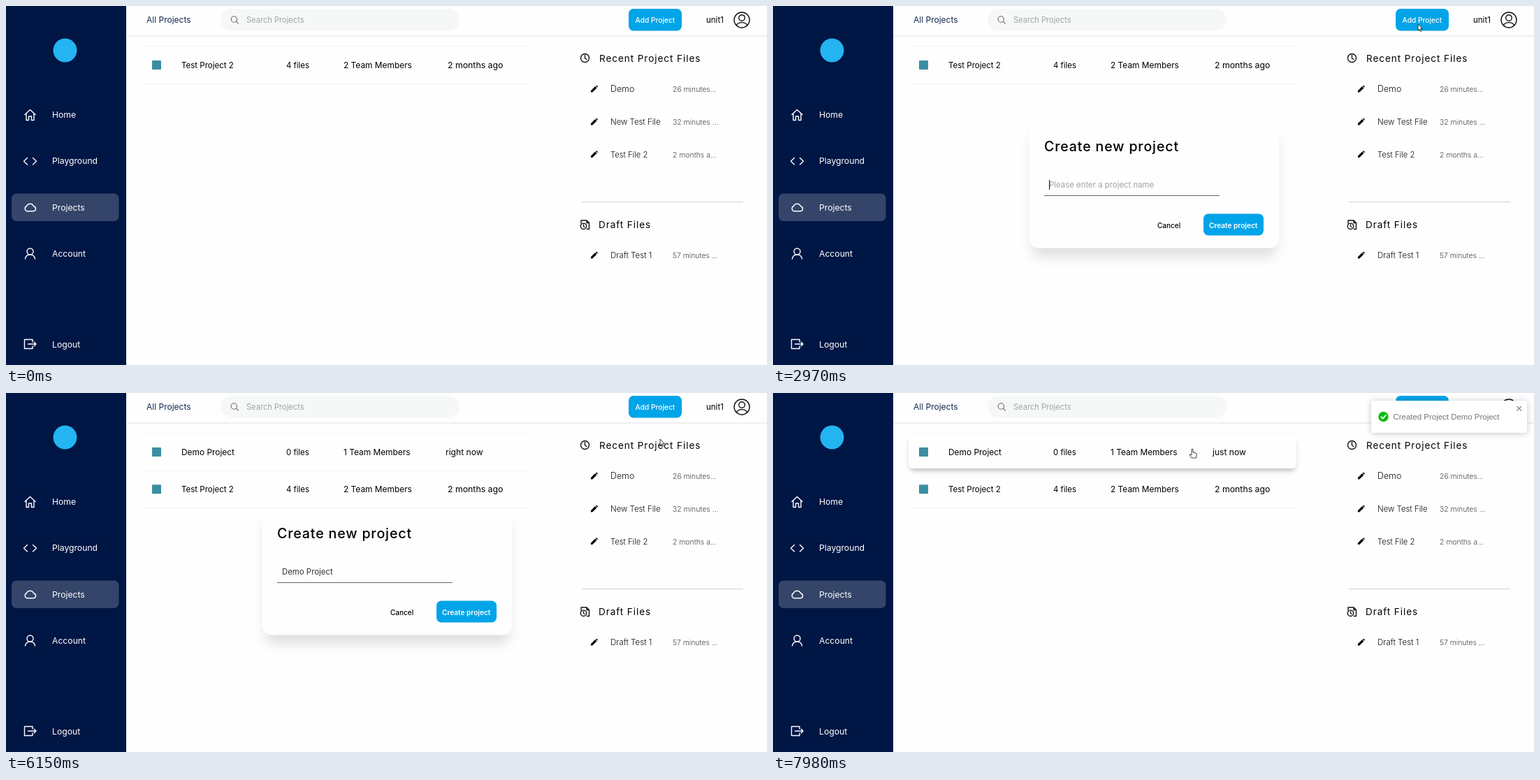
Write an HTML page that moves like this. It is 1089 by 514 pixels and loops after 8 s.

```html
<!DOCTYPE html>
<html lang="en">
<head>
<meta charset="utf-8">
<title>Projects dashboard</title>
<style>
  html, body { margin: 0; width: 100%; height: 100%; overflow: hidden; background: #fefefe; }
  svg { display: block; width: 100vw; height: 100vh; }
  text { font: 12px Inter, sans-serif; white-space: pre; }
  .line { fill: none; stroke: #fff; stroke-width: 1.4; stroke-linecap: round; stroke-linejoin: round; }
  .dark { stroke: #111; }
  .rule { stroke: #f4f5f5; }
  .blue { fill: #00a4e8; }
  #files text { font-weight: 300; }
  .cursor path { fill: #fff; stroke: #111; stroke-width: .8; stroke-linejoin: round; }
</style>
</head>
<body>
<svg viewBox="0 0 1089 514">
  <defs>
    <path id="pencil" d="M-4.6 4.6V2.3L1.6-3.9 3.9-1.6-2.3 4.6ZM2.3-4.5 3-5.1Q3.6-5.5 4.2-5L5-4.2Q5.5-3.6 5.1-3L4.5-2.3Z"/>
    <rect id="swatch" x="209" y="78" width="13" height="13" rx="1" fill="#3b8ea2"/>
  </defs>
  <rect width="1089" height="514" fill="#fefefe"/>

  <!-- project rows -->
  <path class="rule" d="M194 57.5H750M194 111.5H750"/>
  <path id="newRule" class="rule" d="M194 164.5H750"/>
  <g id="card">
    <rect x="196" y="66" width="551" height="45" rx="6" fill-opacity=".26" style="filter:blur(3.5px)"/>
    <rect x="194" y="58" width="555" height="50" rx="6" fill="#fefefe"/>
  </g>
  <g id="newRow">
    <use href="#swatch"/>
    <text x="251" y="88.5" style="font-size:11.9px">Demo Project</text>
    <text x="401" y="88.5" style="font-size:11.4px">0 files</text>
    <text x="483" y="88.5" style="font-size:11.9px">1 Team Members</text>
    <text id="age" x="629" y="88.5" style="font-size:12.1px">right now</text>
  </g>
  <g id="oldRow">
    <use href="#swatch"/>
    <text x="251" y="88.5" style="font-size:11.5px">Test Project 2</text>
    <text x="401" y="88.5" style="font-size:11.4px">4 files</text>
    <text x="483" y="88.5" style="font-size:11.9px">2 Team Members</text>
    <text x="632" y="88.5" style="font-size:12.3px">2 months ago</text>
  </g>

  <!-- header -->
  <rect x="172" y="42" width="917" height="2" fill="#efefef"/>
  <rect x="172" width="917" height="42" fill="#fefefe"/>
  <text x="201" y="24" fill="#14284e">All Projects</text>
  <rect x="307" y="4" width="342" height="31.5" rx="15.7" fill="#f6f8f8"/>
  <g class="line" style="stroke:#666;stroke-width:1.1"><circle cx="326.3" cy="19" r="4.2"/><path d="M329.4 22.2 332.5 25.2"/></g>
  <text x="344" y="23.8" fill="#a0a3a5" style="font-size:11.1px">Search Projects</text>
  <g id="add">
    <rect class="blue" x="891" y="4" width="76" height="31.5" rx="7"/>
    <text x="900.5" y="23.7" fill="#fff" style="font-size:10.2px;font-weight:500">Add Project</text>
  </g>
  <text x="1002" y="24" style="font-size:11.5px">unit1</text>
  <g class="line dark"><circle cx="1053" cy="20" r="11"/><circle cx="1053" cy="17" r="4.3"/><path d="M1045.5 27.8Q1047 23.6 1053 23.6T1060.5 27.8"/></g>

  <!-- recent files -->
  <g class="line dark"><circle cx="828.5" cy="74.5" r="6"/><path d="M828.5 70.5V75L831 76.5"/></g>
  <text x="849" y="79.5" style="font-size:13.5px;letter-spacing:.95px">Recent Project Files</text>
  <path d="M824 280.5H1055" stroke="#d2d3d3"/>
  <g class="line dark"><path d="M823 311V307H831L834.5 310.5V319.5H831.5M831 307V310.5H834.5"/><circle cx="826.5" cy="315.3" r="4.2"/><path d="M826.5 313V315.5L828 316.5"/></g>
  <text x="848" y="318" style="font-size:13.5px;letter-spacing:.95px">Draft Files</text>
  <g id="files"></g>

  <!-- sidebar -->
  <rect width="172" height="514" fill="#001644"/>
  <circle cx="84.5" cy="63.5" r="17" fill="#24b4f2"/>
  <rect x="8" y="268.5" width="153.5" height="39.5" rx="7" fill="#344569"/>
  <g class="line">
    <path d="M27 155.5 34.5 148.5 42 155.5M29 154V163.5H32.5V158H36.5V163.5H40V154"/>
    <path d="M30.5 217.5 25.5 222.3 30.5 227M38.5 217.5 43.5 222.3 38.5 227"/>
    <path d="M30 293.8A3.9 3.9 0 0 1 29.5 286.5A5.4 5.4 0 0 1 39.5 286.7A3.6 3.6 0 0 1 39.5 293.8Z"/>
    <circle cx="34.5" cy="351.5" r="4.5"/>
    <path d="M27.5 362Q28.5 356 34.5 356T41.5 362"/>
    <path d="M38 481V477.5H26.5V490.5H38V487M31.5 484H43M40.3 481.3 43 484 40.3 486.7"/>
  </g>
  <g id="menu"></g>

  <!-- dialog -->
  <g id="dialog">
    <rect x="371" y="184" width="349" height="175" rx="13" fill-opacity=".12" style="filter:blur(8.5px)"/>
    <rect x="367" y="170" width="357" height="176.5" rx="13" fill="#fefefe"/>
    <text x="388" y="207.8" style="font-size:19.6px;font-weight:500;letter-spacing:.85px">Create new project</text>
    <text id="hint" x="395" y="260.3" fill="#a0a3a5" style="font-size:11.4px">Please enter a project name</text>
    <text id="typed" x="395" y="260.3" fill="#333" style="font-size:11.4px"></text>
    <rect id="caret" y="249" width="1" height="14" fill="#222"/>
    <path d="M388 271.5H639" stroke="#666"/>
    <text x="550" y="317.5" style="font-size:10px;font-weight:500">Cancel</text>
    <rect class="blue" x="616" y="297.5" width="86" height="31" rx="7"/>
    <text x="624" y="317.5" fill="#fff" style="font-size:10.1px;font-weight:600">Create project</text>
  </g>

  <!-- toast, drawn at its resting place -->
  <g id="toast">
    <rect x="856" y="11" width="223" height="46" rx="3" fill="#fff" style="filter:drop-shadow(0 1px 4px rgba(0,0,0,.22))"/>
    <circle cx="873.5" cy="34" r="7.2" fill="#07bc0c"/>
    <path class="line" style="stroke-width:1.8" d="M870.3 34.2 872.7 36.7 877 31.7"/>
    <text x="887.5" y="38" fill="#757575" style="font:11.45px 'Liberation Sans',Arial,sans-serif">Created Project Demo Project</text>
    <path d="M1064.5 19 1071 25.5M1071 19 1064.5 25.5" stroke="#888" stroke-width="1.2"/>
  </g>

  <g id="cursor" class="cursor">
    <path id="arrow" d="M0 0V9L2 7.2 3.5 10.5 5 9.8 3.5 6.6H6.3Z"/>
    <path id="hand" d="M-1 1.2Q-1 0 0 0T1 1.2V5L5 5.8Q6.5 6.2 6.3 8L5.5 13H-1L-4 8.5Q-3.6 7-1 9Z"/>
  </g>
</svg>
<script>
const LOOP = 8000;
const $ = id => document.getElementById(id);
const label = (x, y, size, fill, s) =>
  `<text x="${x}" y="${y}" fill="${fill}" style="font-size:${size}px">${s}</text>`;

$('menu').innerHTML = [['Home', 160], ['Playground', 226], ['Projects', 292.7], ['Account', 359], ['Logout', 488.5]]
  .map(([s, y]) => label(66, y, 12.2, '#fff', s)).join('');

$('files').innerHTML = [
  ['Demo', '26 minutes…', 119, 12.4],
  ['New Test File', '32 minutes …', 166, 11.4],
  ['Test File 2', '2 months a…', 212.5, 11.2],
  ['Draft Test 1', '57 minutes …', 357, 11.5]
].map(([name, age, y, size]) =>
  `<use href="#pencil" x="841.5" y="${y}"/>` +
  label(865, y + 4.3, size, '#111', name) + label(954, y + 4, 10.4, '#44474f', age)).join('');

const clamp = v => Math.max(0, Math.min(1, v));
const easeOut = p => 1 - (1 - p) ** 3;
const smooth = p => p * p * (3 - 2 * p);
const show = (id, on) => $(id).style.display = on ? '' : 'none';

// Interpolates rows of [time, ...values]
function track(keys, t, ease = p => p) {
  let i = 0;
  while (i < keys.length - 2 && t >= keys[i + 1][0]) i++;
  const [a, b] = [keys[i], keys[i + 1]];
  const p = ease(clamp((t - a[0]) / (b[0] - a[0])));
  return a.slice(1).map((v, k) => v + (b[k + 1] - v) * p);
}

const mousePath = [
  [270, 916, 500], [350, 790, 400], [430, 682, 328], [465, 656, 314], [500, 669, 312], [740, 669, 312],
  [1370, 923, 26], [5280, 923, 26], [5480, 936, 66], [6980, 936, 66], [7180, 869.5, 45.5],
  [7430, 740, 60], [7610, 600, 80], [7840, 600, 80], [7890, 596, 75], [7980, 600, 80]
];
const bounce = [[0, 2085], [.6, -17], [.75, 7], [.9, -3.5], [1, 0]];
const name = 'Demo Project';
const keyTimes = [3000, 3080, 3250, 3420, 3570, 3750, 3910, 4010, 4110, 4210, 4300, 4540];

function draw(t) {
  const [mx, my] = track(mousePath, t, t > 740 && t < 1370 ? smooth : undefined);
  const inside = (x, y, w, h) => mx >= x && mx <= x + w && my >= y && my <= y + h;

  // rows
  const added = t >= 5900;
  show('newRow', added);
  show('newRule', added);
  $('oldRow').setAttribute('transform', `translate(0 ${added ? 53.3 : 0})`);
  $('age').textContent = t < 7840 ? 'right now' : 'just now';
  $('card').style.opacity = clamp((t - 7420) / 150);

  // button grows while hovered
  const grow = 1 + .02 * (clamp((t - 1220) / 150) - clamp((t - 1680) / 150));
  $('add').setAttribute('transform', `translate(929 19.75) scale(${grow}) translate(-929 -19.75)`);

  // dialog
  const pop = easeOut(clamp((t - 1650) / 280));
  show('dialog', t >= 1680 && t < 6630);
  $('dialog').style.opacity = pop;
  $('dialog').setAttribute('transform', `translate(545.5 258) scale(${.95 + .05 * pop}) translate(-545.5 -258)`);
  const typed = name.slice(0, keyTimes.filter(k => t >= k).length);
  $('typed').textContent = typed;
  show('hint', !typed);
  show('caret', (t >= 1930 && t < 2430) || (t >= 2970 && t < 5080) || (t >= 5620 && t < 6150));
  $('caret').setAttribute('x', 395 + Math.round($('typed').getComputedTextLength()));

  // toast
  const p = clamp((t - 6622) / 850);
  const [shift] = track(bounce, p, easeOut);
  show('toast', t >= 6900);
  $('toast').style.opacity = easeOut(clamp(p / .6));
  $('toast').setAttribute('transform', `translate(${shift} 0)`);

  // pointer
  const hand = (t < 1680 && inside(891, 4, 76, 31)) ||
    (t > 6950 && inside(856 + shift, 11, 223, 46)) || (t > 6630 && inside(194, 58, 555, 50));
  show('cursor', t >= 270);
  show('hand', hand);
  show('arrow', !hand);
  $('cursor').setAttribute('transform', `translate(${mx} ${my})`);
}

const start = performance.now();
function tick() {
  draw((performance.now() - start) % LOOP);
  requestAnimationFrame(tick);
}
tick();
</script>
</body>
</html>
```
